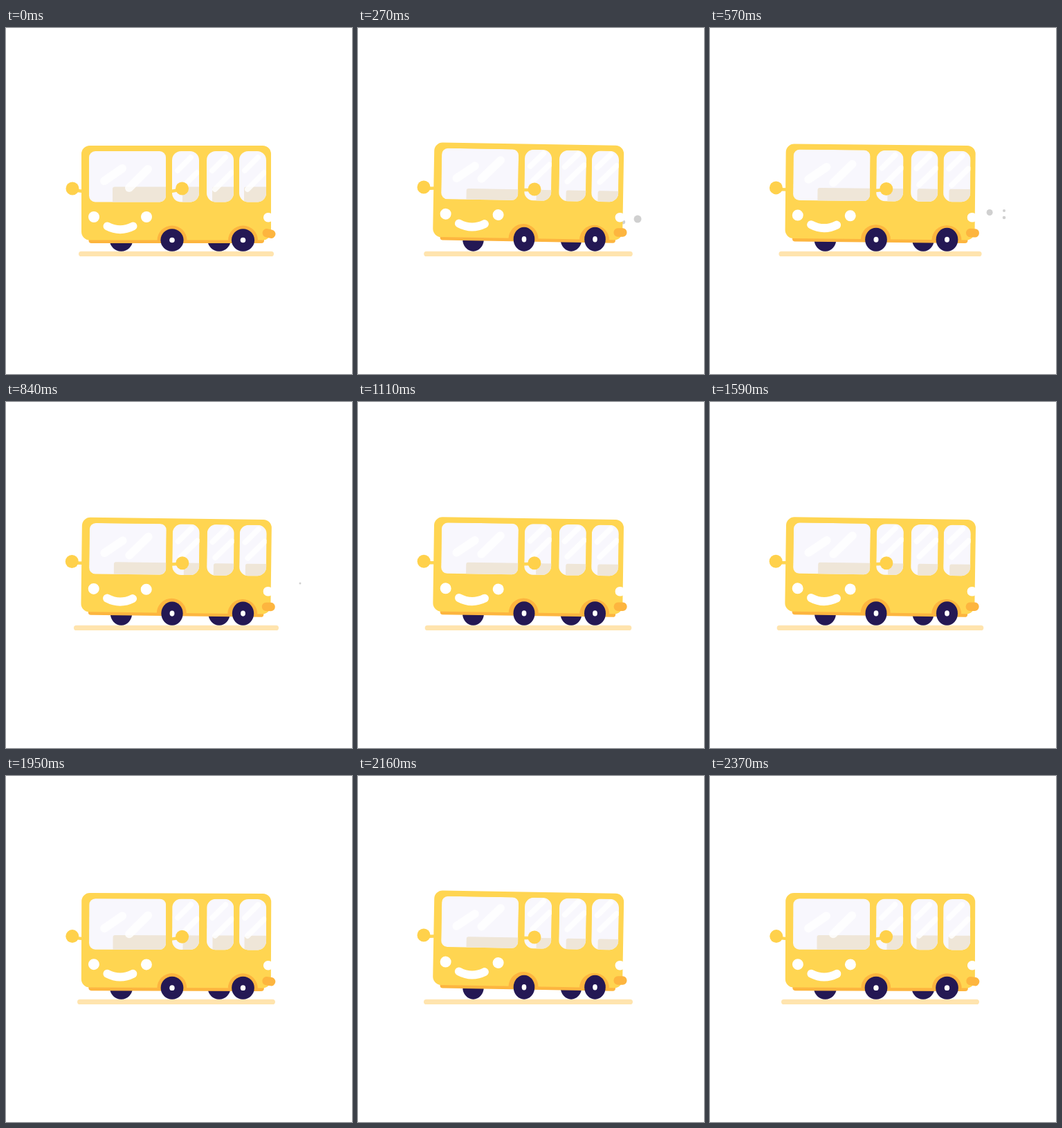
Write an HTML page with a canvas that moves like this. It is 500 by 500 pixels and loops after 2400 ms.

```html
<!DOCTYPE html>
<html lang="en">
<head>
<meta charset="utf-8">
<title>Bouncing bus</title>
<style>
html, body { margin: 0; width: 100%; height: 100%; overflow: hidden; background: #fff; }
canvas { display: block; width: 500px; height: 500px; }
</style>
</head>
<body>
<canvas id="stage" width="500" height="500"></canvas>
<script>
const ctx = document.getElementById('stage').getContext('2d');
const LOOP = 2400, BOUNCE = 480, STEP = 30;
const YELLOW = '#ffd551', ORANGE = '#fdb53f', NAVY = '#241854', WHITE = '#fff';
const GLASS = '#f8f7fd', SEAT = '#efe6d8', GROUND = '#ffe4ae', SMOKE = '#d0d0d0';

const mix = (a, b, k) => a + (b - a) * k;

function box(x, y, w, h, r, color) {
  ctx.fillStyle = color;
  ctx.beginPath();
  ctx.roundRect(x, y, w, h, r);
  ctx.fill();
}

function oval(x, y, rx, ry, color) {
  ctx.fillStyle = color;
  ctx.beginPath();
  ctx.ellipse(x, y, rx, ry, 0, 0, Math.PI * 2);
  ctx.fill();
}

function line(x1, y1, x2, y2, width, color) {
  ctx.strokeStyle = color;
  ctx.lineWidth = width;
  ctx.lineCap = 'round';
  ctx.beginPath();
  ctx.moveTo(x1, y1);
  ctx.lineTo(x2, y2);
  ctx.stroke();
}

// Each puff drifts out at constant speed, then shrinks in place.
const puffs = [
  { start: 90, size: 5.5, endY: 274, fade: 430 },
  { start: 240, size: 3, endY: 264, fade: 300 },
  { start: 390, size: 4.5, endY: 262, fade: 330 }
];

function drawPuff({ start, size, endY, fade }, time) {
  const age = time - start;
  if (age < 0) return;
  const k = Math.min(1, age / 330);
  const r = size * Math.min(1, 1 - (age - 230) / fade);
  if (r <= 0) return;
  oval(mix(379, 425, k), mix(284, endY, 1 - (1 - k) ** 2), r, r, SMOKE);
}

function drawWindow(x, w, r, lift, seatX, stripes) {
  ctx.save();
  ctx.beginPath();
  ctx.roundRect(x, 178, w, 73.5, r);
  ctx.clip();
  ctx.fillStyle = GLASS;
  ctx.fillRect(x, 178, w, 74);
  box(seatX + 2.5 * lift, 229.5 + 6.5 * lift, 130, 40, 3, SEAT);
  ctx.globalAlpha = 0.85;
  for (const [x1, y1, x2, y2, width, rise] of stripes) {
    line(x1, y1 - rise * lift, x2, y2 - rise * lift, width, WHITE);
  }
  ctx.restore();
}

function drawSideWindow(x, seatX, lift) {
  drawWindow(x, 39, 13, lift, seatX, [
    [x + 8, 206, x + 27, 187, 8, 4],
    [x + 12, 233, x + 36, 209, 8, 10]
  ]);
}

function drawBody(lift) {
  ctx.save();
  ctx.translate(380, 250);
  ctx.rotate(lift * Math.PI / 180);
  ctx.translate(-380, -250);

  box(119.5, 296, 253.5, 15, 4, ORANGE);
  box(109, 170, 274, 136.5, 12, YELLOW);
  for (const x of [240, 342.5]) {
    ctx.fillStyle = ORANGE;
    ctx.beginPath();
    ctx.arc(x, 307, 21.5, Math.PI, 0);
    ctx.fill();
  }

  drawWindow(120, 111, 9, lift, 154, [
    [142, 221, 168, 203, 12, 0],
    [178, 231, 205, 204, 12, 10]
  ]);
  drawSideWindow(240, 255, lift);
  drawSideWindow(290, 298, lift);
  drawSideWindow(337, 344, lift);

  oval(127, 273, 8, 8, WHITE);
  oval(203, 273, 8, 8, WHITE);
  ctx.strokeStyle = WHITE;
  ctx.lineWidth = 12;
  ctx.beginPath();
  ctx.moveTo(146.5, 286.5);
  ctx.quadraticCurveTo(165, 296, 183.5, 286.5);
  ctx.stroke();
  box(372, 267, 14, 13.5, 6.5, WHITE);
  ctx.restore();
}

function drawPipe(lift) {
  ctx.save();
  ctx.translate(mix(380, 379, lift), mix(297, 295.5, lift));
  ctx.rotate(13 * (1 - lift) ** 2 * Math.PI / 180);
  box(-9.5, -6.2, 19, 12.4, 6, ORANGE);
  ctx.restore();
}

function drawMirrors(lift) {
  const leftX = mix(96, 95, lift), leftY = mix(232, 230, lift);
  const rightX = mix(254.5, 255, lift), rightY = mix(232, 233, lift);
  line(leftX, leftY + 2, 111, mix(236, 231.5, lift), 4.5, YELLOW);
  line(rightX, rightY + 1, 239, mix(236, 234, lift), 4.5, YELLOW);
  oval(leftX, leftY, 9.5, 9.5, '#ffd14b');
  oval(rightX, rightY, 9.5, 9.5, '#ffd14b');
}

function draw(time) {
  const lift = Math.sin(Math.PI * (time % BOUNCE) / BOUNCE);
  const rx = mix(16.6, 15.3, lift), ry = mix(16.2, 17.5, lift);
  const wheelY = 322.7 - ry;

  ctx.fillStyle = WHITE;
  ctx.fillRect(0, 0, 500, 500);

  const reach = 10 * lift;
  box(105 - reach, 322.7, 282 + 2 * reach, 7.4, 3.7, GROUND);
  for (const puff of puffs) drawPuff(puff, time);
  for (const x of [166.5, 308]) oval(x, wheelY, rx, ry, NAVY);
  drawBody(lift);
  drawPipe(lift);
  for (const x of [240, 342.5]) {
    oval(x, wheelY, rx, ry, NAVY);
    oval(x, wheelY, mix(3.8, 3.3, lift), mix(3.8, 4.2, lift), WHITE);
  }
  drawMirrors(lift);
}

const origin = performance.now();

function tick() {
  const time = (performance.now() - origin) % LOOP;
  draw(Math.floor(time / STEP) * STEP);
  requestAnimationFrame(tick);
}
tick();
</script>
</body>
</html>
```
